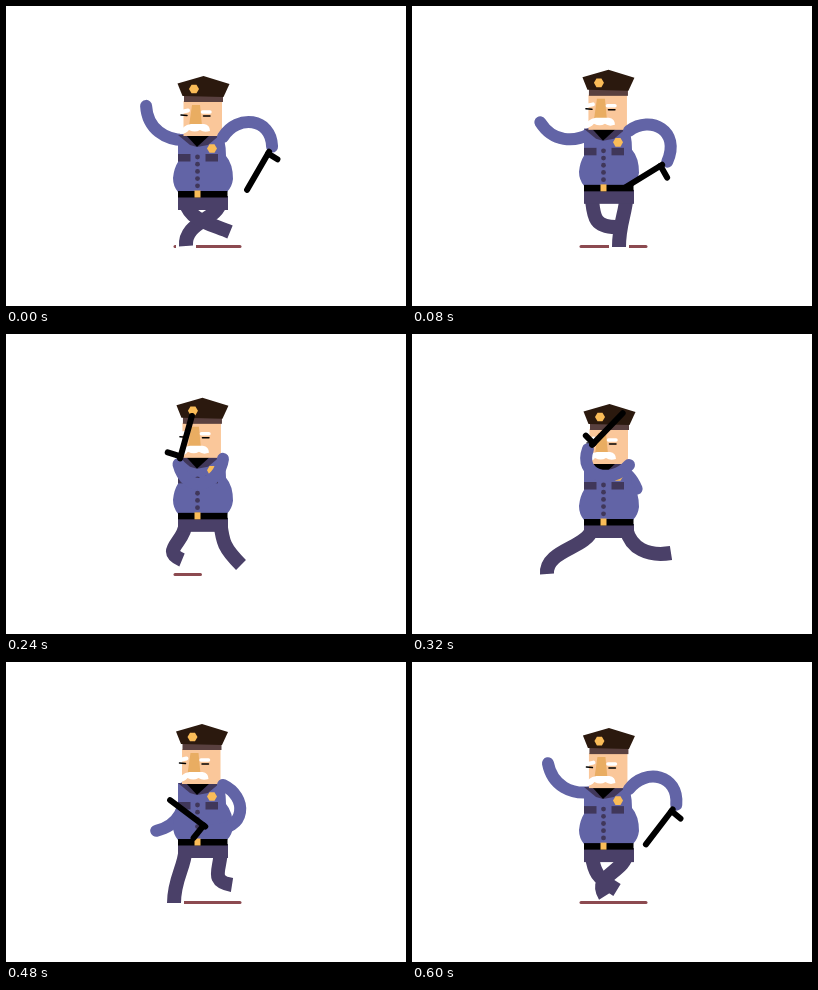
Animation, 400 px wide and 300 px high, one loop 0.64 s. Source, as an HTML page with a canvas:

```html
<!DOCTYPE html>
<html lang="en">
<head>
<meta charset="utf-8">
<title>Marching officer</title>
<style>
  html, body { margin: 0; width: 100%; height: 100%; overflow: hidden; background: #fff; }
  canvas { display: block; }
</style>
</head>
<body>
<canvas id="stage" width="400" height="300"></canvas>
<script>
const ctx = document.getElementById('stage').getContext('2d');
const STEP = 40, STEPS = 16, FLOOR = 241;

const SHIRT = '#6264a6', TROUSERS = '#4a4068', DARK = '#40375a', HAT = '#2b190e',
      BAND = '#59403f', SKIN = '#fac79a', NOSE = '#e9ad62', GOLD = '#fabc58',
      GROUND = '#8c4a50', BLACK = '#000', WHITE = '#fff';

// Step, then front foot x, y and rear foot x, y.
const feet = [
  [0, 224, 226, 180, 240],
  [2, 204, 221, 207, 241],
  [4, 204, 219, 223, 241],
  [6, 176, 226, 235, 231],
  [8, 135, 240, 259, 219],
  [12, 168, 241, 226, 223],
  [15, 205, 228, 193, 234]
];

// Smooth periodic curve through the keys.
function sample(keys, at) {
  const n = keys.length;
  const key = i => keys[(i + n) % n];
  const time = i => key(i)[0] + STEPS * Math.floor(i / n);
  let i = n - 1;
  while (keys[i][0] > at) i--;
  const t0 = time(i), t1 = time(i + 1), span = t1 - t0, u = (at - t0) / span;
  return key(i).slice(1).map((a, k) => {
    const value = j => key(j)[k + 1];
    const b = value(i + 1);
    const m0 = (b - value(i - 1)) / (t1 - time(i - 1)) * span;
    const m1 = (value(i + 2) - a) / (time(i + 2) - t0) * span;
    return a + u * (m0 + u * (3 * (b - a) - 2 * m0 - m1 + u * (2 * (a - b) + m0 + m1)));
  });
}

// Point at a distance and an angle in degrees from x, y.
function polar(x, y, deg, r) {
  const a = deg * Math.PI / 180;
  return [x + r * Math.cos(a), y + r * Math.sin(a)];
}

function poly(color, ...p) {
  ctx.fillStyle = color;
  ctx.beginPath();
  for (let i = 0; i < p.length; i += 2) ctx.lineTo(p[i], p[i + 1]);
  ctx.fill();
}

function box(color, x, y, w, h) {
  ctx.fillStyle = color;
  ctx.fillRect(x, y, w, h);
}

function shape(color, path) {
  ctx.fillStyle = color;
  ctx.fill(new Path2D(path));
}

function line(color, width, x0, y0, x1, y1) {
  ctx.strokeStyle = color;
  ctx.lineWidth = width;
  ctx.lineCap = 'round';
  ctx.beginPath();
  ctx.moveTo(x0, y0);
  ctx.lineTo(x1, y1);
  ctx.stroke();
}

function limb(color, width, cap, x, y, ...curve) {
  ctx.strokeStyle = color;
  ctx.lineWidth = width;
  ctx.lineCap = cap;
  ctx.beginPath();
  ctx.moveTo(x, y);
  ctx.bezierCurveTo(...curve);
  ctx.stroke();
}

function hexagon(x, y, r) {
  const p = [];
  for (let a = 0; a < 360; a += 60) p.push(...polar(x, y, a, r));
  poly(GOLD, ...p);
}

// The whole arm turns about the shoulder; each bend is an angle behind the hand and a radius.
function drawArm(x, y, deg, reach, upper, lower) {
  const hand = polar(x, y, deg, reach);
  limb(SHIRT, 12, 'round', x, y,
    ...polar(x, y, deg - upper[0], upper[1]),
    ...polar(x, y, deg - lower[0], lower[1]), ...hand);
  return hand;
}

// The shin stands upright on the floor and lies back as the foot lifts.
function drawLeg(x, y, footX, footY) {
  const lift = (FLOOR - footY) / 20;
  limb(TROUSERS, 14, 'butt', x, y,
    x + (footX - x) * 0.1, y + 18,
    ...polar(footX, footY, 270 - 90 * lift, 24), footX, footY);
}

function drawBaton(hand, deg, grip) {
  const [x, y] = polar(...hand, deg, 8);
  line(BLACK, 6, ...polar(x, y, deg + 180, 2), ...polar(x, y, deg, 42));
  line(BLACK, 6, x, y, ...polar(x, y, deg - 88, grip));
}

function drawGround(fill, footX, footY) {
  const width = 67 * Math.min(1, fill);
  if (width > 3) line(GROUND, 3, 169, 240.5, 167 + width, 240.5);
  if (footY > 238) ctx.clearRect(footX - 10, 238, 20, 5);
}

function drawTorso() {
  box(TROUSERS, 172, 190, 50, 14);
  shape(SHIRT, 'M172 129H215Q220 133 220 150Q227 158 227 173Q226 181 221 186' +
    'H172Q167 180 167 172Q168 162 172 156Z');
  poly(DARK, 172, 129, 183, 129, 191, 141, 184, 139);
  poly(DARK, 214, 129, 201, 129, 191, 141, 202, 139);
  poly(BLACK, 180, 129, 204, 129, 191, 141);
  box(DARK, 172, 148, 12.5, 7.5);
  box(DARK, 199.5, 148, 12.5, 7.5);
  for (let i = 0; i < 5; i++) {
    ctx.fillStyle = DARK;
    ctx.beginPath();
    ctx.arc(191.5, 151 + i * 7.2, 2.4, 0, 7);
    ctx.fill();
  }
  hexagon(206, 142.5, 5);
  box(BLACK, 172, 185, 49.5, 6.5);
  box(GOLD, 188.5, 184.5, 6, 7);
}

function drawFace() {
  box(SKIN, 177.5, 95, 38.5, 35);
  poly(NOSE, 186, 99, 194, 99, 196, 120, 183, 120);
  line(WHITE, 4, 175, 106, 182, 104.5);
  line(WHITE, 3.5, 196.5, 106, 204, 106);
  line(BLACK, 1.5, 175, 109, 181, 109.5);
  line(BLACK, 1.5, 197.5, 110, 204, 110);
  shape(WHITE, 'M174 128Q176 119 185 118H198Q204 119 204 125Q198 127 194 124' +
    'Q189 127 183 124Q180 128 174 128Z');
  box(BAND, 178, 89, 39, 7);
}

function drawHat() {
  poly(HAT, 171.5, 77.5, 197.5, 70, 223.5, 78, 217.5, 91, 176.5, 90);
  hexagon(188, 83, 5);
}

function draw(at) {
  const phase = at / STEPS * 2 * Math.PI;
  const swing = Math.cos(phase), pass = Math.abs(Math.sin(phase));
  const bob = -8 * pass ** 0.75;
  const [frontX, frontY, rearX, rearY] = sample(feet, at);

  ctx.clearRect(0, 0, 400, 300);
  drawGround(1.4 * (1 + swing), rearX, rearY);
  if (frontY > 238) ctx.clearRect(frontX - 10, 238, 20, 5);
  drawArm(178, 134 + bob, 123 + 99 * swing, 51, [42, 18], [26, 38]);
  drawLeg(214.5, 196 + bob, rearX, rearY);
  drawLeg(179.5, 196 + bob, frontX, frontY);

  ctx.save();
  ctx.translate(0, bob);
  drawTorso();
  ctx.translate(-1.5 * pass, 0);
  drawFace();
  drawHat();
  ctx.restore();

  const bend = 12 * pass * pass;
  const hand = drawArm(217, 131 + bob, 106 - 95 * swing, 47 + 3 * swing,
    [69 + bend, 27], [33 + bend, 52]);
  drawBaton(hand, 217 - 97 * swing, 11 + 5 * pass * pass);
}

const start = performance.now();
function tick() {
  draw(Math.floor((performance.now() - start) / STEP) % STEPS);
  requestAnimationFrame(tick);
}
tick();
</script>
</body>
</html>
```
